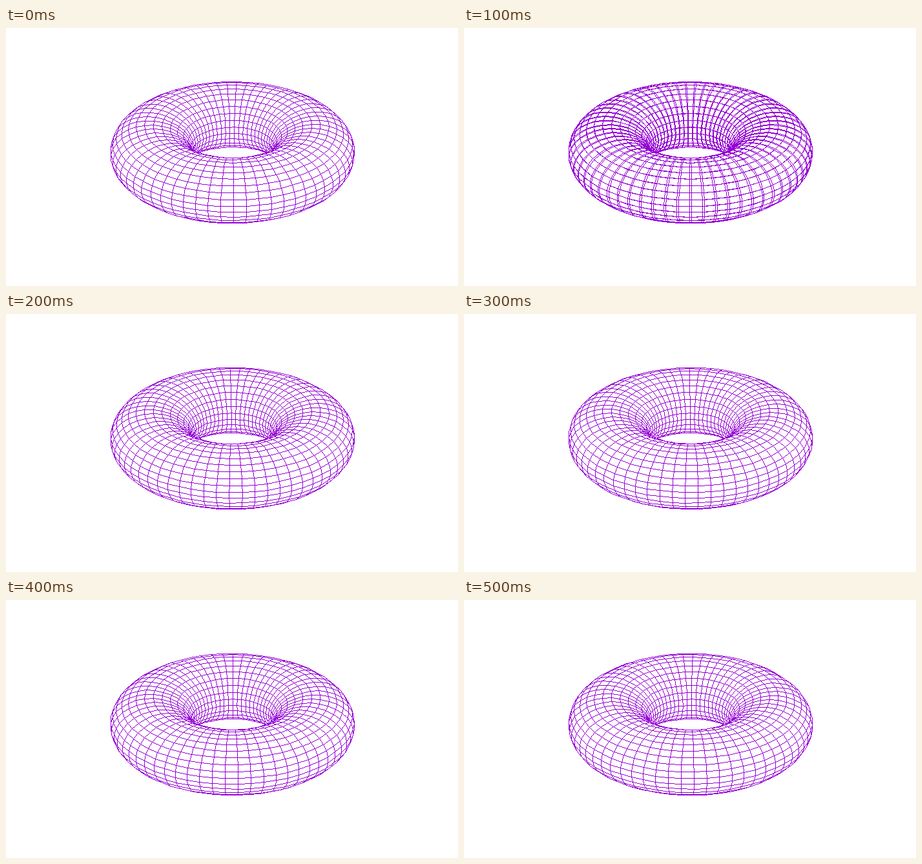
Recreate the animation shown at these times as an HTML page with a canvas. Size 700 by 400 pixels, loop 600 ms.

```html
<!DOCTYPE html>
<html>
<head>
<meta charset="utf-8">
<style>
html, body { margin: 0; width: 100%; height: 100%; overflow: hidden; background: #fff; }
canvas { display: block; }
</style>
</head>
<body>
<canvas id="stage" width="700" height="400"></canvas>
<script>
const W = 700, H = 400, RAD = Math.PI / 180;
const RINGS = 59, TUBE = 29;           // mesh cells around the axis and around the tube
const TILT = 35 * RAD, POSES = 6, HOLD = 100;

// Vertex of the torus, turned by `turn` degrees about its axis.
function project(i, j, turn) {
  const u = (360 * i / RINGS - 180 - turn) * RAD;
  const v = (360 * j / TUBE - 180) * RAD;
  const rho = (2 + Math.cos(v)) / 3;
  const y = rho * Math.sin(u), z = Math.sin(v) * 2 / 3;
  return {
    x: 350.3 + 189 * rho * Math.cos(u),
    y: 192.5 - 108 * (y * Math.cos(TILT) + z * Math.sin(TILT)),
    near: z * Math.cos(TILT) - y * Math.sin(TILT)
  };
}

// One pixel wide line without smoothing.
function line(g, a, b) {
  const n = Math.max(Math.abs(b.x - a.x), Math.abs(b.y - a.y)) || 1;
  for (let k = 0; k <= n; k++) {
    g.fillRect(Math.round(a.x + (b.x - a.x) * k / n), Math.round(a.y + (b.y - a.y) * k / n), 1, 1);
  }
}

function drawQuad(g, corners) {
  const p = corners.map(c => ({ x: Math.round(c.x), y: Math.round(c.y) }));
  g.fillStyle = '#fff';
  g.beginPath();
  p.forEach(c => g.lineTo(c.x + 0.5, c.y + 0.5));
  g.fill();
  g.fillStyle = '#9400d3';
  line(g, p[0], p[1]);
  line(g, p[3], p[2]);
  line(g, p[0], p[3]);
  line(g, p[1], p[2]);
}

// Hidden-line view of the mesh on a transparent canvas.
function render(turn) {
  const c = document.createElement('canvas');
  c.width = W;
  c.height = H;
  const g = c.getContext('2d', { willReadFrequently: true });
  const quads = [];
  for (let i = 0; i < RINGS; i++) {
    for (let j = 0; j < TUBE; j++) {
      const q = [[i, j], [i + 1, j], [i + 1, j + 1], [i, j + 1]].map(([a, b]) => project(a, b, turn));
      const area = (q[2].x - q[0].x) * (q[3].y - q[1].y) - (q[2].y - q[0].y) * (q[3].x - q[1].x);
      if (area < 0) quads.push({ q, near: q.reduce((s, p) => s + p.near, 0) });
    }
  }
  quads.sort((a, b) => a.near - b.near).forEach(o => drawQuad(g, o.q));

  // Keep only solid line pixels.
  const img = g.getImageData(0, 0, W, H), d = img.data;
  for (let k = 0; k < d.length; k += 4) {
    const on = d[k + 3] > 127 && d[k + 1] < 128;
    d[k] = 148;
    d[k + 1] = 0;
    d[k + 2] = 211;
    d[k + 3] = on ? 255 : 0;
  }
  g.putImageData(img, 0, 0);
  return c;
}

const poses = Array.from({ length: POSES }, (_, i) => render(i + 1));
const ctx = document.getElementById('stage').getContext('2d');
const start = performance.now();

function tick() {
  const i = Math.floor((performance.now() - start) / HOLD) % POSES;
  ctx.clearRect(0, 0, W, H);
  ctx.drawImage(poses[i], 0, 0);
  if (i === 1) ctx.drawImage(poses[0], 0, 0); // the first pose lingers for one step
  requestAnimationFrame(tick);
}
tick();
</script>
</body>
</html>
```
